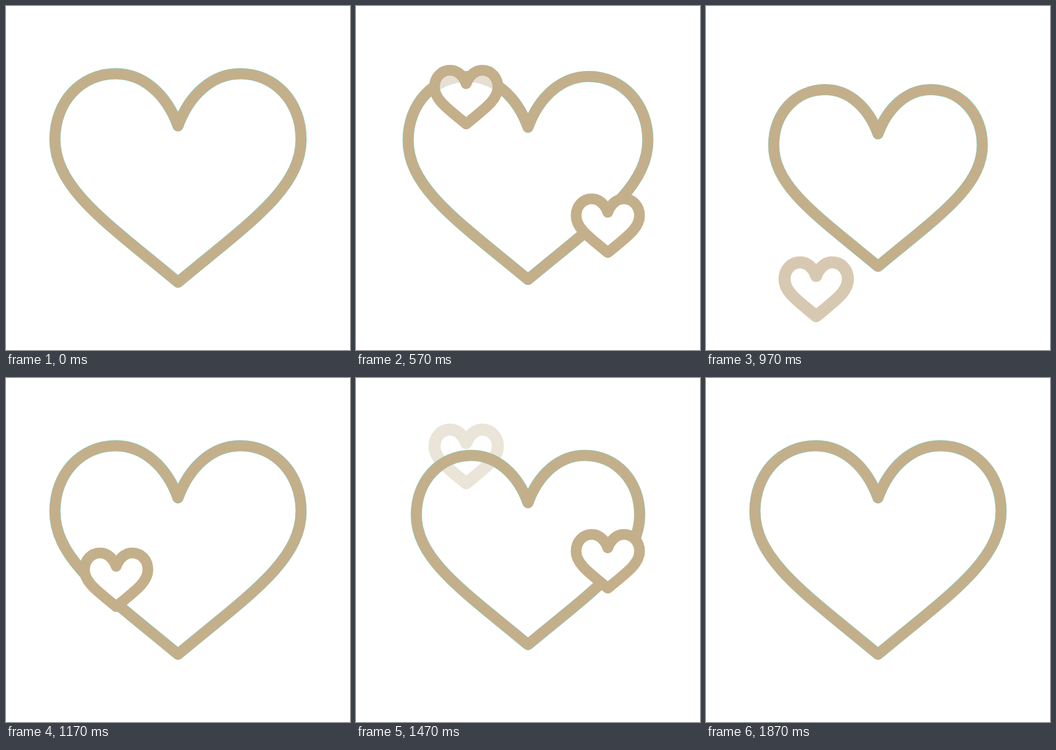
Animation, 640 px wide and 640 px high, one loop 1940 ms. Source, as an HTML page with a canvas:

```html
<!DOCTYPE html>
<html lang="en">
<head>
<meta charset="utf-8">
<title>Beating heart</title>
<style>
  html, body { margin: 0; height: 100%; overflow: hidden; background: #fff; }
  canvas { display: block; width: 100vmin; height: 100vmin; }
</style>
</head>
<body>
<canvas width="640" height="640"></canvas>
<script>
const ctx = document.querySelector('canvas').getContext('2d');
const LOOP = 1940, GOLD = '#c4af8b', FRINGE = '#6fe3df';
const BEATS = [130, 618, 1365], HALF_BEAT = 244;          // ms
const RISE = 18;                                          // steps a small heart travels
const SMALL = [[205, 2], [468.5, 10], [205, 27], [468.5, 35]]; // x, first step

// Heart outline around its own centre
const outline = new Path2D(`M0-97C-21-155-64-194-116-194C-180.5-194-229-141.5-229-72
  C-229 20-130 85.5 0 194C130 85.5 229 20 229-72C229-141.5 180.5-194 116-194C64-194 21-155 0-97Z`);

const clamp = v => Math.max(0, Math.min(1, v));
const wave = u => (1 - Math.cos(Math.PI * u)) / 2;

function heartAt(x, y, scale) {
  const path = new Path2D();
  path.addPath(outline, new DOMMatrix([scale, 0, 0, scale, x, y]));
  return path;
}

function stroke(path, width, color) {
  ctx.lineWidth = width;
  ctx.strokeStyle = color;
  ctx.stroke(path);
}

function drawBig(ms) {
  let scale = 1;
  for (const start of BEATS) {
    const u = (ms - start) / HALF_BEAT;
    if (u > 0 && u < 2) scale -= 0.25 * wave(u);
  }
  const path = heartAt(320, 320, scale);
  stroke(path, 20.9, FRINGE);
  stroke(path, 20, GOLD);
}

function drawSmall(x, step) {
  if (step <= 0 || step >= RISE) return;
  const path = heartAt(x, 539 - 396 * wave(step / RISE), 0.2576);
  const alpha = clamp(Math.min(step, RISE - step) / 3);
  // The white inside fades a little ahead of the line
  ctx.globalAlpha = clamp(Math.min(step, RISE - 1 - step) * 0.3);
  ctx.fillStyle = '#fff';
  ctx.fill(path);
  ctx.globalAlpha = alpha;
  stroke(path, alpha < 1 ? 22.5 : 20, GOLD);
  ctx.globalAlpha = 1;
}

function draw(now) {
  // 30 steps a second, each starting on a whole hundredth
  const step = Math.floor((Math.floor(now % LOOP / 10) + 0.5) * 0.3);
  ctx.clearRect(0, 0, 640, 640);
  ctx.lineJoin = 'round';
  drawBig(step * 1000 / 30);
  for (const [x, first] of SMALL) drawSmall(x, step - first);
}

const begin = performance.now();
function tick() {
  draw(performance.now() - begin);
  requestAnimationFrame(tick);
}
tick();
</script>
</body>
</html>
```
